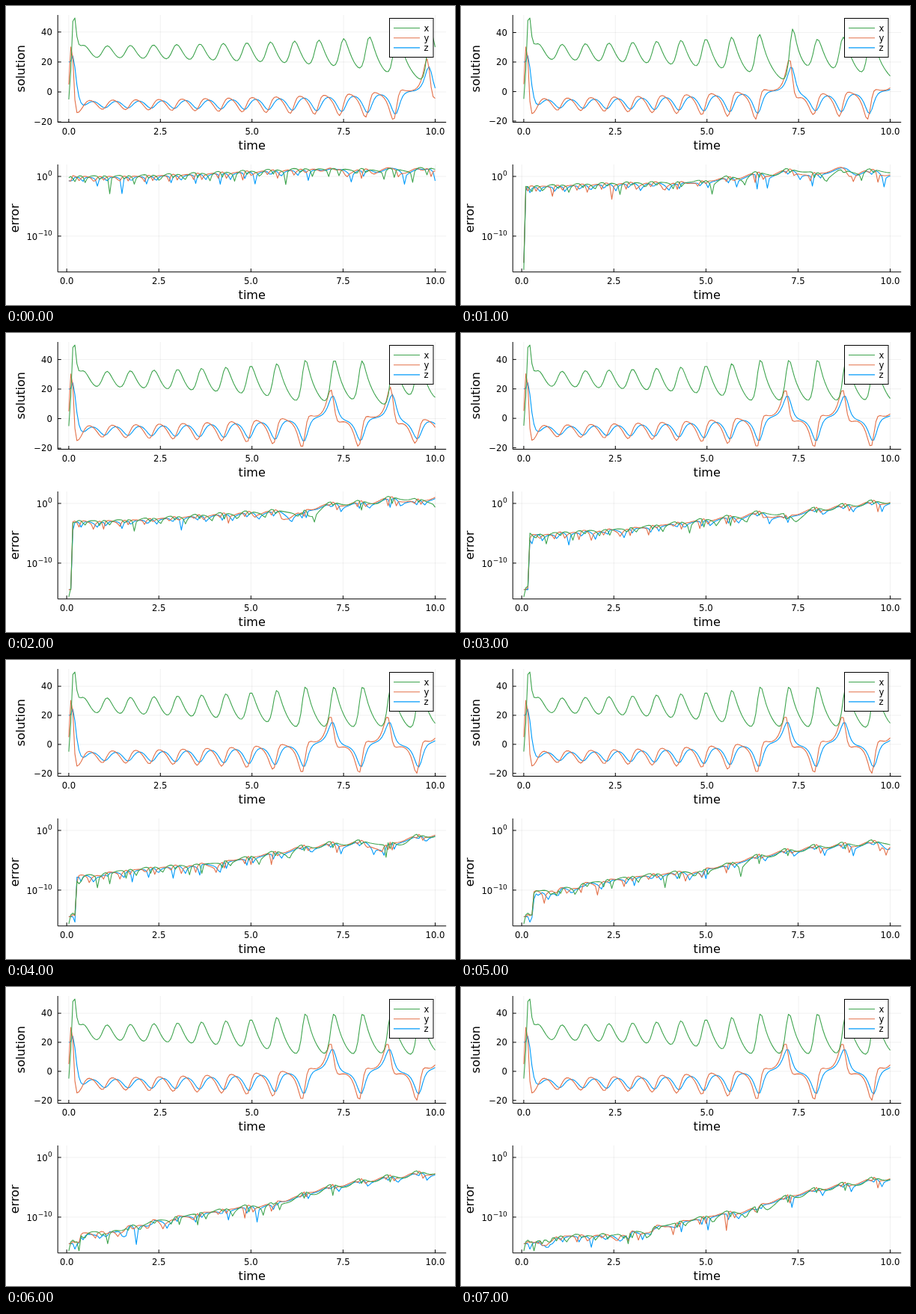
An HTML page for the animation above (8000 ms loop, 600 by 400 pixels).

```html
<!DOCTYPE html>
<html lang="en">
<head>
<meta charset="utf-8">
<title>Parallel-in-time solution of the Lorenz system</title>
<style>
html, body { margin: 0; width: 100%; height: 100%; overflow: hidden; background: #fff; }
svg { display: block; width: 600px; height: 400px; }
text { font-family: "DejaVu Sans", sans-serif; font-size: 11.6px; fill: #000; }
.guide { font-size: 16px; }
.axis { stroke: #000; stroke-width: 1; fill: none; }
.grid { stroke: #000; stroke-opacity: .1; stroke-width: .6; fill: none; }
.curve { fill: none; stroke-width: 1.1; stroke-linejoin: round; }
</style>
</head>
<body>
<svg id="stage" viewBox="0 0 600 400"></svg>
<script>
const STEPS = 180, FINE = 80, SPAN = 10, DT = SPAN / STEPS;
const ROUNDS = 8, HOLD = 1000, START = [20, 5, -5];
const BLUE = "#009afa", ORANGE = "#e36f47", GREEN = "#3ea44e";
const COLORS = [BLUE, ORANGE, GREEN];
const LEFT = 69.2, RIGHT = 588.2, PAD = 0.03;
const TOP = { y0: 12, y1: 155.5 }, BOTTOM = { y0: 212, y1: 355.8 };

// Lorenz system, classic Runge-Kutta steps
const slope = ([x, y, z]) => [10 * (y - x), x * (28 - z) - y, x * y - 8 / 3 * z];
const axpy = (u, h, k) => u.map((v, i) => v + h * k[i]);

function rk4(u, h) {
  const a = slope(u), b = slope(axpy(u, h / 2, a));
  const c = slope(axpy(u, h / 2, b)), d = slope(axpy(u, h, c));
  return u.map((v, i) => v + h / 6 * (a[i] + 2 * b[i] + 2 * c[i] + d[i]));
}
const coarse = u => rk4(u, DT);
function fine(u) {
  for (let i = 0; i < FINE; i++) u = rk4(u, DT / FINE);
  return u;
}
function march(step) {
  const path = [START];
  for (let n = 0; n < STEPS; n++) path.push(step(path[n]));
  return path;
}
// Parareal correction: fine(old) + coarse(new) - coarse(old)
function correct(old) {
  const next = [START];
  for (let n = 0; n < STEPS; n++) {
    const f = fine(old[n]), g = coarse(next[n]), g0 = coarse(old[n]);
    next.push(f.map((v, i) => v + g[i] - g0[i]));
  }
  return next;
}

const exact = march(fine);
const rounds = [march(coarse)];
while (rounds.length < ROUNDS) rounds.push(correct(rounds[rounds.length - 1]));

// Scales
function padded(lo, hi, a, b) {
  const m = PAD * (hi - lo);
  return v => a + (v - lo + m) / (hi - lo + 2 * m) * (b - a);
}
const topX = padded(0, SPAN, LEFT, RIGHT);
const lowX = padded(DT, SPAN, LEFT, RIGHT);
const lowY = e => BOTTOM.y1 + (e + 16) / 18 * (BOTTOM.y0 - BOTTOM.y1);

// SVG helpers
const stage = document.getElementById("stage");
function add(tag, attrs, parent = stage) {
  const el = document.createElementNS("http://www.w3.org/2000/svg", tag);
  for (const k in attrs) el.setAttribute(k, attrs[k]);
  return parent.appendChild(el);
}
function label(str, x, y, anchor = "middle", attrs = {}) {
  const el = add("text", { x, y, "text-anchor": anchor, ...attrs });
  el.textContent = str;
  return el;
}
const line = (cls, d) => add("path", { class: cls, d });

function guides(box, name, x) {
  const mid = (LEFT + RIGHT) / 2;
  label("time", mid, box.y1 + 36.5, "middle", { class: "guide" });
  label(name, 0, 0, "middle", {
    class: "guide", transform: `translate(${x} ${(box.y0 + box.y1) / 2}) rotate(-90)`
  });
}
function frame(box, scale) {
  for (let t = 0; t <= SPAN; t += 2.5) {
    const x = scale(t);
    line("grid", `M${x} ${box.y0}V${box.y1}`);
    line("axis", `M${x} ${box.y1}v-4.5`);
    label(t.toFixed(1), x, box.y1 + 16.2);
  }
  line("axis", `M${LEFT} ${box.y0}V${box.y1}H${RIGHT}`);
}
const curves = () => COLORS.map(c => add("path", { class: "curve", stroke: c }));

frame(TOP, topX);
guides(TOP, "solution", 25);
const ticks = [-20, 0, 20, 40].map(v => ({
  v,
  grid: line("grid", ""),
  mark: line("axis", ""),
  text: label(String(v).replace("-", "\u2212"), 61.8, 0, "end")
}));
const topCurves = curves();

frame(BOTTOM, lowX);
guides(BOTTOM, "error", 16.5);
for (const e of [0, -10]) {
  const y = lowY(e);
  line("grid", `M${LEFT} ${y}H${RIGHT}`);
  line("axis", `M${LEFT} ${y}h4.5`);
  const sup = label(String(e).replace("-", "\u2212"), 61.8, y - .8, "end");
  sup.style.fontSize = "9px";
  label("10", e ? 42.2 : 55.6, y + 5, "end");
}
const lowCurves = curves();

add("rect", { x: 512.5, y: 16.5, width: 58.5, height: 52, fill: "#fff", stroke: "#000" });
[["x", GREEN], ["y", ORANGE], ["z", BLUE]].forEach(([name, color], i) => {
  const y = 29.5 + 13.2 * i;
  add("path", { class: "curve", stroke: color, d: `M518 ${y}H553` });
  label(name, 558.5, y + 4.2, "start");
});

const join = pts => "M" + pts.map(p => p[0].toFixed(2) + " " + p[1].toFixed(2)).join("L");

function show(path) {
  const all = path.flat();
  const scale = padded(Math.min(...all), Math.max(...all), TOP.y1, TOP.y0);
  for (const { v, grid, mark, text } of ticks) {
    const y = scale(v);
    grid.setAttribute("d", `M${LEFT} ${y}H${RIGHT}`);
    mark.setAttribute("d", `M${LEFT} ${y}h4.5`);
    text.setAttribute("y", y + 4.2);
  }
  for (let i = 0; i < 3; i++) {
    const sol = path.map((u, n) => [topX(n * DT), scale(u[i])]);
    const err = path.map((u, n) => {
      const e = Math.max(Math.abs(u[i] - exact[n][i]), Number.EPSILON);
      return [lowX(n * DT), lowY(Math.log10(e))];
    }).slice(1);
    topCurves[i].setAttribute("d", join(sol));
    lowCurves[i].setAttribute("d", join(err));
  }
}

let shown = -1;
const begin = performance.now();
function tick() {
  const k = Math.floor((performance.now() - begin) / HOLD) % ROUNDS;
  if (k !== shown) show(rounds[shown = k]);
  requestAnimationFrame(tick);
}
tick();
</script>
</body>
</html>
```
